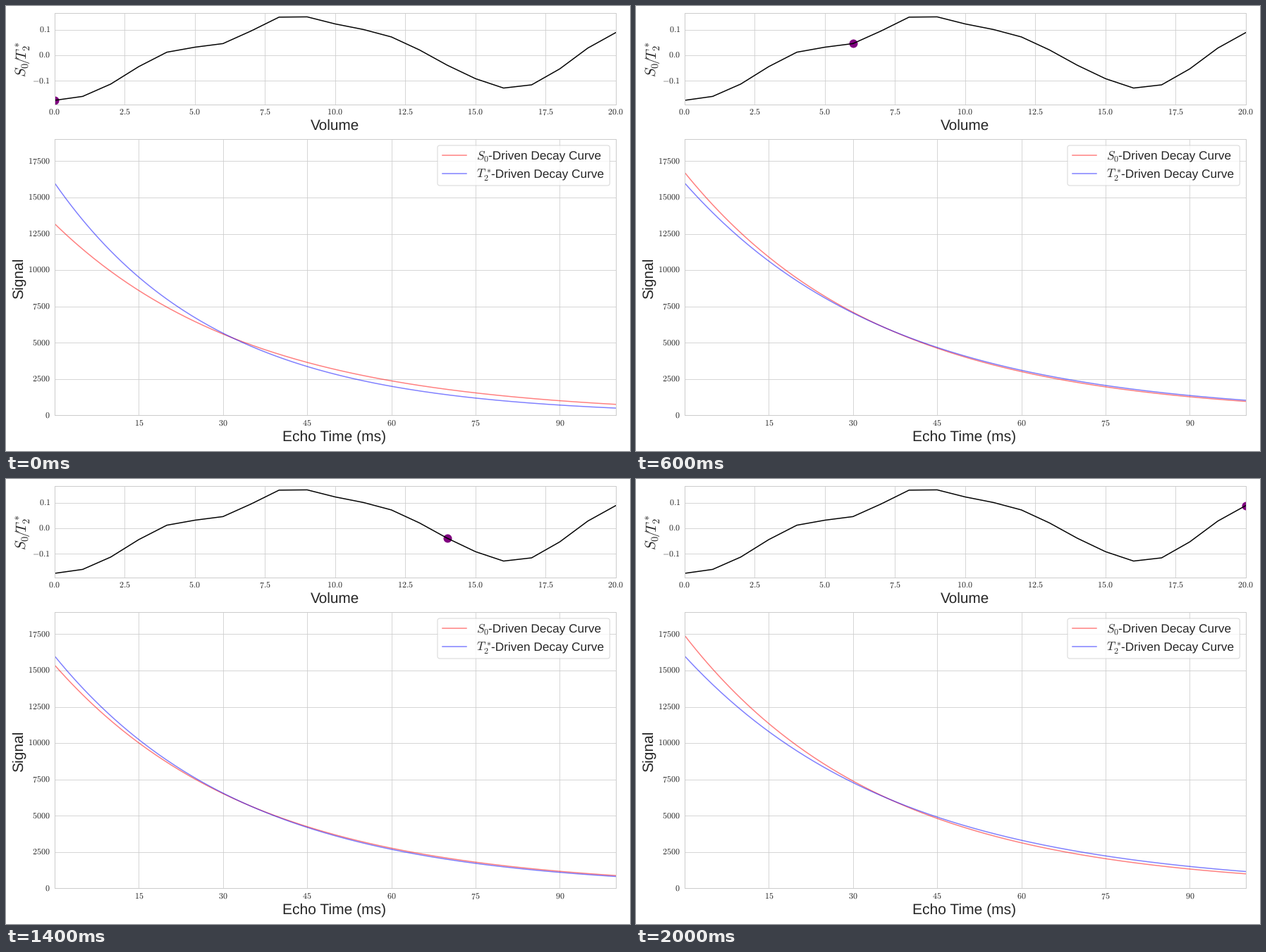
A matplotlib script that plays this animation: 885x632 px, repeating every 2.1 s.

```python
import matplotlib.pyplot as plt
import numpy as np
from matplotlib.animation import FuncAnimation
from matplotlib.lines import Line2D
from matplotlib.patches import FancyBboxPatch
from matplotlib.transforms import Affine2D

plt.rcParams["font.family"] = "Liberation Sans"
plt.rcParams["mathtext.fontset"] = "cm"
plt.rcParams["text.hinting"] = "none"

W, H, DPI = 885, 632, 72
LEFT, RIGHT = 68.9, 864.9
INK, GRID = "0.15", "0.8"
TICK, LEGEND, LABEL = 12, 17.28, 20.74

S0, T2 = 16000, 35
drift = np.array([
    -0.1753, -0.160, -0.112, -0.044, 0.012, 0.0315, 0.0455,
    0.0945, 0.1485, 0.1495, 0.122, 0.1005, 0.0715, 0.021,
    -0.039, -0.091, -0.1275, -0.115, -0.053, 0.028, 0.0885])
volumes = np.arange(len(drift))
echo = np.linspace(0, 100, 201)

fig = plt.figure(figsize=(W / DPI, H / DPI), dpi=DPI, facecolor="white")
# Pixel coordinates with the origin at the top left
px = Affine2D().scale(1 / W, -1 / H).translate(0, 1) + fig.transFigure


def write(x, y, text, size, ha="center", rotation=0):
    fig.text(x, y, text, transform=px, fontsize=size, color=INK, ha=ha,
             va="baseline", rotation=rotation, rotation_mode="anchor")


def panel(top, bottom, xlim, ylim, xticks, yticks, fmt):
    ax = fig.add_axes([LEFT / W, 1 - bottom / H,
                       (RIGHT - LEFT) / W, (bottom - top) / H])
    ax.set(xlim=xlim, ylim=ylim, xticks=xticks, yticks=yticks)
    ax.set_axisbelow(True)
    ax.grid(color=GRID, linewidth=0.8)
    ax.tick_params(length=0, labelbottom=False, labelleft=False)
    ax.spines[:].set(color=GRID, linewidth=1)
    for t in xticks:
        x = np.interp(t, xlim, (LEFT, RIGHT))
        write(x, bottom + 15, f"${t:{fmt}}$", TICK)
    for t in yticks:
        y = np.interp(t, ylim, (bottom, top))
        write(63, y + 4, f"${t:{fmt}}$", TICK, ha="right")
    return ax


upper = panel(10, 140, (0, 20), (-0.1918, 0.1644),
              np.arange(0, 20.1, 2.5), (-0.1, 0.0, 0.1), ".1f")
lower = panel(189.4, 581.4, (0, 100), (0, 19000),
              range(15, 100, 15), range(0, 17501, 2500), "d")

write(466.3, 176, "Volume", LABEL)
write(465.3, 617.6, "Echo Time (ms)", 21)
write(28.5, 75.5, r"$S_0\!/\!T_2^*$", LABEL, rotation=90)
write(24, 387, "Signal", 21, rotation=90)

upper.plot(volumes, drift, color="black", linewidth=1.5)
dot, = upper.plot([], [], "o", color="purple", markersize=12,
                  markeredgewidth=0, zorder=1)
s0_curve, = lower.plot([], [], color="red", alpha=0.5, linewidth=1.5)
t2_curve, = lower.plot([], [], color="blue", alpha=0.5, linewidth=1.5)

fig.add_artist(FancyBboxPatch(
    (612, 198), 244.3, 57, boxstyle="round,pad=0,rounding_size=3.46",
    transform=px, facecolor="white", edgecolor=GRID, linewidth=1, alpha=0.8))
for y, color, symbol, x in ((211.5, "red", "$S_0$", 684.5),
                            (237.5, "blue", "$T_2^*$", 687.8)):
    fig.add_artist(Line2D([618.8, 653.3], [y, y], transform=px, color=color,
                          alpha=0.5, linewidth=1.5))
    write(667.2, y + 6.4, symbol, LEGEND, ha="left")
    write(x, y + 6.4, "-Driven Decay Curve", LEGEND, ha="left")


def update(i):
    gain = 1 + drift[i]
    dot.set_data([volumes[i]], [drift[i]])
    s0_curve.set_data(echo, S0 * gain * np.exp(-echo / T2))
    t2_curve.set_data(echo, S0 * np.exp(-echo / (T2 * gain)))
    return dot, s0_curve, t2_curve


anim = FuncAnimation(fig, update, frames=len(drift), interval=100,
                     repeat=True, repeat_delay=0)
plt.show()
```
